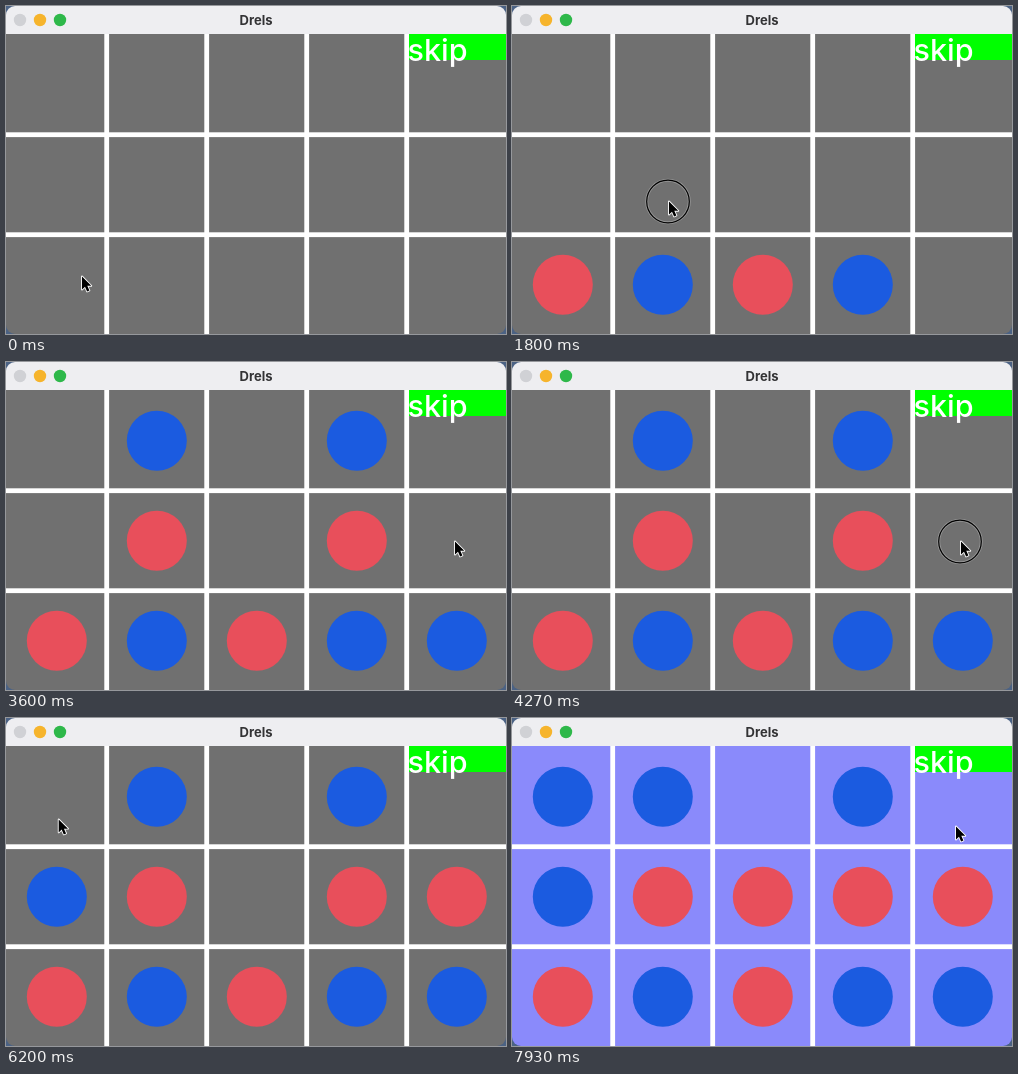
An HTML page with a canvas for the animation above (8000 ms loop, 500 px wide and 328 px high).

```html
<!DOCTYPE html>
<html lang="en">
<head>
<meta charset="utf-8">
<title>Drels</title>
<style>
  html, body { margin: 0; width: 100%; height: 100%; overflow: hidden; background: #4b6284; }
  canvas { display: block; width: 500px; height: 328px; }
</style>
</head>
<body>
<canvas id="stage" width="500" height="328"></canvas>
<script>
const ctx = document.getElementById('stage').getContext('2d');
const LOOP = 8000, PRESS = 130, TRAVEL = 370, BAR = 28, CELL = 100;
const COLORS = ['#e84f5b', '#1b5be0'];

// Mouse presses: time, x, y. The two players alternate.
const presses = [
  [170, 75, 270], [600, 111, 270], [1170, 242, 270], [1450, 335, 270],
  [1740, 156, 195], [2000, 156, 195], [2280, 335, 188], [2520, 335, 188],
  [3170, 444, 46], [3470, 448, 179], [4240, 448, 179], [5070, 51, 75],
  [5600, 444, 46], [6210, 51, 101], [6740, 250, 188]
];
const stops = [...presses, [7930, 443, 108]];
const winTime = presses.at(-1)[0] + PRESS;

// A press drops a piece onto its column's stack, unless it hits "skip".
const height = [0, 0, 0, 0, 0];
const pieces = [];
presses.forEach(([time, x, y], turn) => {
  const col = Math.floor(x / CELL);
  if (col === 4 && y < 55) return;
  const row = 2 - height[col]++;
  pieces.push({ time: time + PRESS, col, row, color: COLORS[turn % 2] });
});

const arrow = new Path2D('M0 0V13L3 10.2 5.1 15 7.4 14 5.3 9.3H9.3Z');

function rect(x, y, w, h, color) {
  ctx.fillStyle = color;
  ctx.fillRect(x, y, w, h);
}

function circle(x, y, r) {
  ctx.beginPath();
  ctx.arc(x, y, r, 0, Math.PI * 2);
}

function disc(x, y, r, color) {
  circle(x, y, r);
  ctx.fillStyle = color;
  ctx.fill();
}

function stroke(color, width, path) {
  ctx.strokeStyle = color;
  ctx.lineWidth = width;
  path ? ctx.stroke(path) : ctx.stroke();
}

function label(text, x, y, font, color, align) {
  ctx.font = font;
  ctx.fillStyle = color;
  ctx.textAlign = align;
  ctx.fillText(text, x, y);
}

// The pointer rests after each press and leaves just in time for the next one.
function pointerAt(t) {
  const next = stops.findIndex(s => s[0] > t);
  if (next < 1) return stops.at(next).slice(1);
  const [t0, x0, y0] = stops[next - 1], [t1, x1, y1] = stops[next];
  const duration = Math.min(TRAVEL, t1 - t0 - PRESS);
  const p = Math.max(0, 1 - (t1 - t) / duration), ease = p * p * (3 - 2 * p);
  return [x0 + (x1 - x0) * ease, y0 + (y1 - y0) * ease];
}

function drawWindow(t) {
  rect(0, 0, 500, BAR, '#eeeef1');
  ['#d0d1d5', '#f6b42c', '#2eb84a'].forEach((c, i) => disc(14 + 20 * i, 14, 6.2, c));
  label('Drels', 250, 18.5, '700 13px Inter, sans-serif', '#333335', 'center');

  rect(0, BAR, 500, 300, t < winTime ? '#707070' : '#8a8afb');
  for (let i = 1; i < 5; i++) rect(CELL * i - 1.7, BAR, 4.8, 300, '#fff');
  for (let i = 1; i < 3; i++) rect(0, BAR + CELL * i - 1.7, 500, 4.8, '#fff');
  rect(403, BAR, 97, 26, '#00ff00');
  label('skip', 401.5, 55, '500 30.5px Inter, sans-serif', '#fff', 'left');

  for (const { time, col, row, color } of pieces)
    if (t >= time) disc(50.8 + CELL * col, 78.7 + CELL * row, 30, color);
}

function drawPointer(t) {
  ctx.save();
  ctx.translate(...pointerAt(t));
  if (presses.some(([time]) => t >= time && t < time + PRESS)) {
    circle(0, 0.5, 21.3);
    stroke('rgba(255,255,255,.25)', 3);
    stroke('#000', 1.2);
  }
  ctx.translate(1, 0.5);
  ctx.lineJoin = 'round';
  stroke('#fff', 1.8, arrow);
  ctx.fillStyle = '#000';
  ctx.fill(arrow);
  ctx.restore();
}

function frame(now) {
  const t = now % LOOP;
  rect(0, 0, 500, 328, '#4b6284');
  ctx.save();
  ctx.beginPath();
  ctx.roundRect(0, 0, 500, 328, 9);
  ctx.clip();
  drawWindow(t);
  ctx.restore();
  drawPointer(t);
  requestAnimationFrame(frame);
}
requestAnimationFrame(frame);
</script>
</body>
</html>
```
